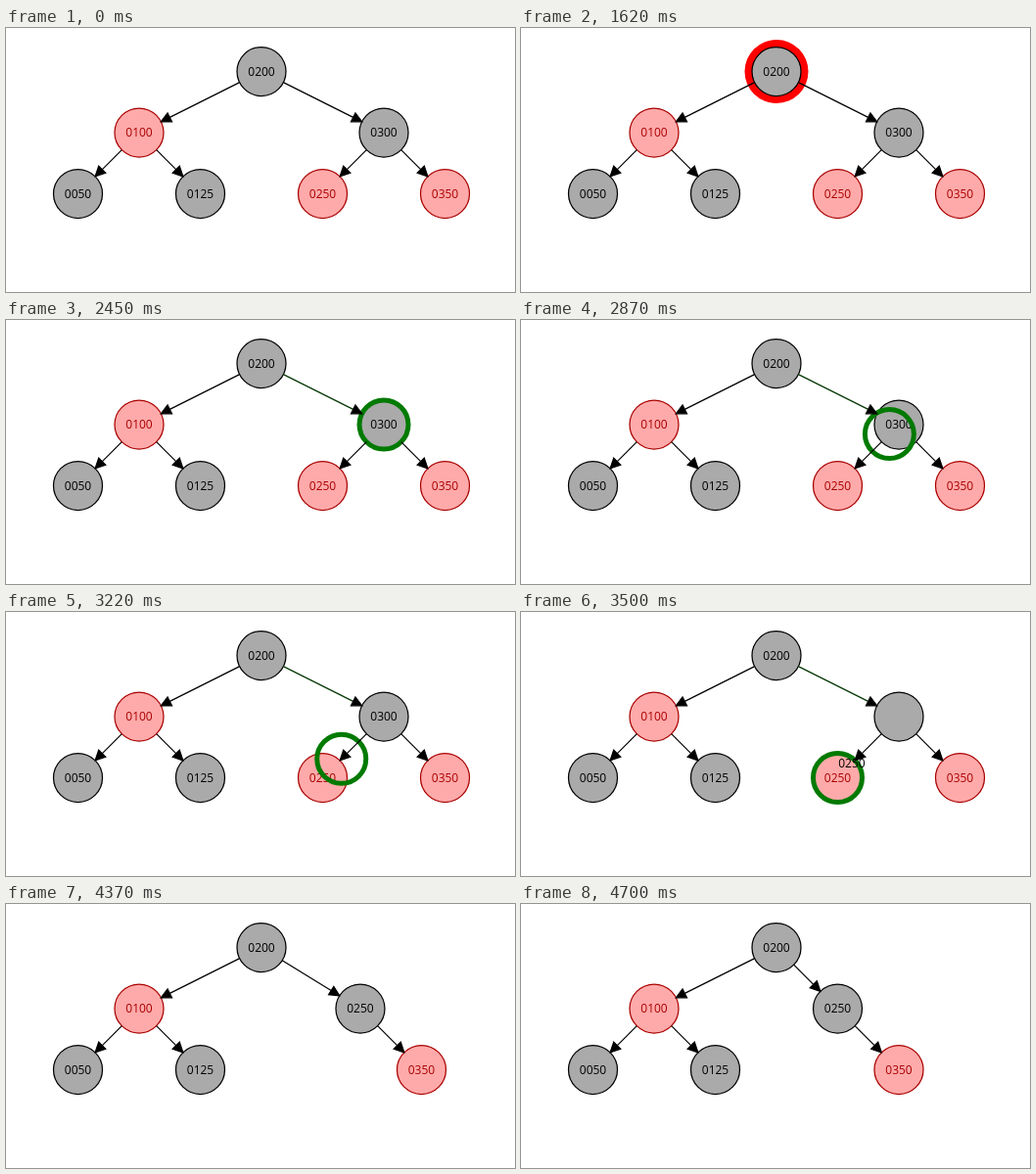
Recreate the animation shown at these times as an HTML page. Size 520 by 270 pixels, loop 5.81 s.

```html
<!DOCTYPE html>
<html lang="en">
<head>
<meta charset="utf-8">
<title>Tree deletion</title>
<style>
html, body { margin: 0; width: 100%; height: 100%; overflow: hidden; background: #fff; }
svg { display: block; }
text { font: 12px "Open Sans", "Noto Sans", sans-serif; text-anchor: middle; }
</style>
</head>
<body>
<svg id="stage" width="520" height="270" viewBox="0 0 520 270"></svg>
<script>
const LOOP = 5810, R = 25, STEPS = 13;
const BLACK = { ink: "#000", fill: "#aaa" };
const RED = { ink: "#a00", fill: "#faa" };
const stage = document.getElementById("stage");

// Slot positions, one column every 62.5 px
const slot = (col, row) => ({ x: 73.5 + 62.5 * col, y: 44.5 + 62.5 * row });
const ROOT = slot(3, 0), LEFT = slot(1, 1), RIGHT = slot(5, 1);
const LL = slot(0, 2), LR = slot(2, 2), RL = slot(4, 2), RR = slot(6, 2);
const MID = slot(4, 1), LAST = slot(5, 2);

const mix = (a, b, k) => ({ x: a.x + (b.x - a.x) * k, y: a.y + (b.y - a.y) * k });
const ticks = (t, start, ms) => Math.floor((t - start) / ms);
const part = n => Math.min(STEPS, n) / STEPS;

function label(p, str, ink = "#000") {
  return `<text x="${p.x}" y="${p.y + 4.2}" fill="${ink}">${str}</text>`;
}

function node(p, str, look) {
  return `<circle cx="${p.x}" cy="${p.y}" r="${R}" fill="${look.fill}" stroke="${look.ink}" stroke-width="1.25"/>` +
    label(p, str, look.ink);
}

function edge(a, b, ink = "#000") {
  const d = Math.hypot(b.x - a.x, b.y - a.y);
  const ux = (b.x - a.x) / d, uy = (b.y - a.y) / d;
  const tip = { x: b.x - ux * R, y: b.y - uy * R };
  const base = { x: tip.x - ux * 10, y: tip.y - uy * 10 };
  return `<path d="M${a.x + ux * R} ${a.y + uy * R}L${tip.x} ${tip.y}" stroke="${ink}" stroke-width="1.25"/>` +
    `<path d="M${tip.x} ${tip.y}L${base.x - uy * 5} ${base.y + ux * 5}L${base.x + uy * 5} ${base.y - ux * 5}Z" stroke="#000" stroke-width="1.25"/>`;
}

// Red halo whose width follows a triangle wave
function halo(p, tick) {
  const r = R + 1.25 * (3 + Math.abs(tick - 21) / 7);
  return `<circle cx="${p.x}" cy="${p.y}" r="${r}" fill="#f00"/>`;
}

function ring(p) {
  return `<circle cx="${p.x}" cy="${p.y}" r="${R}" fill="none" stroke="#007a00" stroke-width="5"/>`;
}

function ringPlace(t) {
  if (t >= 2010 && t < 2490) {
    const n = t < 2210 ? 1 + ticks(t, 2010, 50) : 5 + ticks(t, 2210, 30);
    return mix(ROOT, RIGHT, part(n));
  }
  if (t >= 2820 && t < 3820) {
    const n = t < 3240 ? 1 + ticks(t, 2820, 50) : 10 + ticks(t, 3240, 43);
    return mix(RIGHT, RL, part(n));
  }
  return null;
}

function draw(t) {
  const shift = t < 4190 ? 0 : part(1 + ticks(t, 4190, 42.5));
  const right = mix(RIGHT, MID, shift), last = mix(RR, LAST, shift);
  const copying = t >= 3420 && t < 3820;
  const value = t < 3420 ? "0300" : copying ? "" : "0250";
  const spot = ringPlace(t);
  let out = "";

  if (t >= 1620 && t < 2010) out += halo(ROOT, ticks(t, 1620, 30));
  if (t >= 2490 && t < 2820) out += halo(RIGHT, 26 + ticks(t, 2490, 25.4));

  out += node(ROOT, "0200", BLACK) + node(LEFT, "0100", RED) +
    node(LL, "0050", BLACK) + node(LR, "0125", BLACK);
  if (t < 4190) out += node(RL, "0250", RED);
  out += node(last, "0350", RED) + node(right, value, BLACK);

  if (spot) out += ring(spot);
  if (copying) out += label(mix(RL, RIGHT, part(1 + ticks(t, 3420, 30.7))), "0250");

  out += edge(ROOT, LEFT) + edge(LEFT, LL) + edge(LEFT, LR) +
    edge(ROOT, right, t >= 2450 && t < 4190 ? "#063806" : "#000") + edge(right, last);
  if (t < 3820) out += edge(RIGHT, RL);
  stage.innerHTML = out;
}

const begin = performance.now();
function loop() {
  draw((performance.now() - begin) % LOOP);
  requestAnimationFrame(loop);
}
loop();
</script>
</body>
</html>
```
